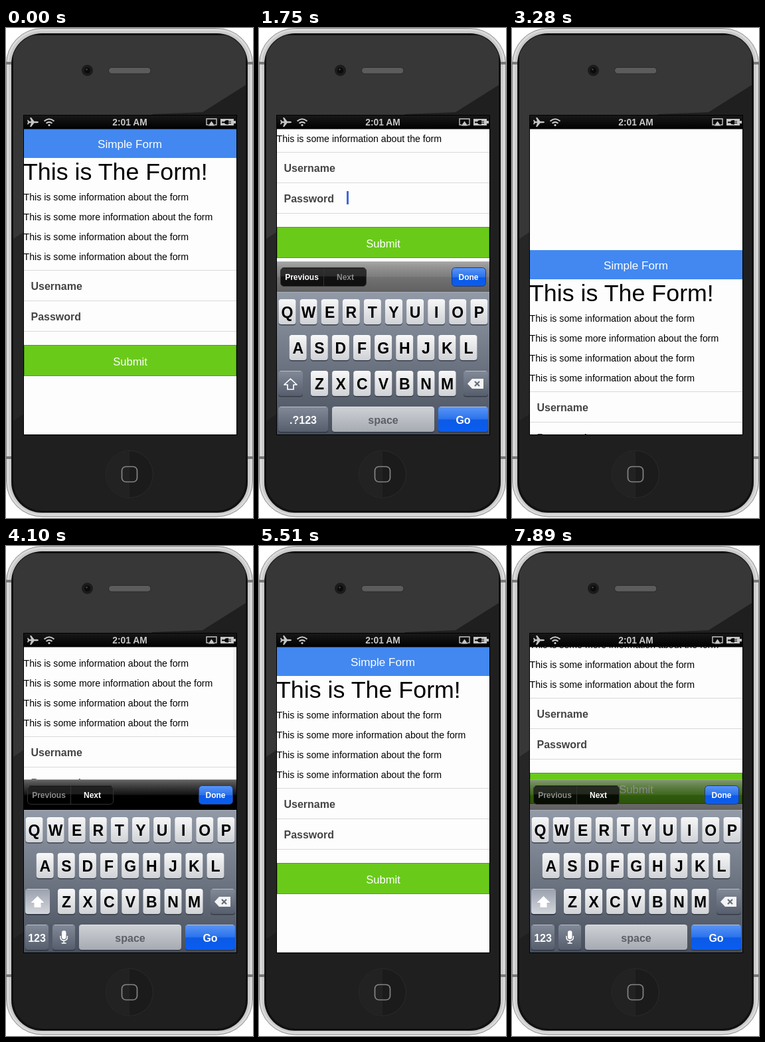
Write an HTML page that moves like this. It is 372 px wide and 739 px high and loops after 8000 ms.

```html
<!DOCTYPE html>
<html lang="en">
<head>
<meta charset="utf-8">
<title>Simple Form</title>
<style>
  html, body { margin: 0; width: 100%; height: 100%; overflow: hidden; background: #fff; }
  svg { display: block; font-family: "Liberation Sans", Arial, sans-serif; }
  .bold { font-weight: bold; }
  .mid { text-anchor: middle; }
  .copy { font-size: 14.17px; }
  .label { font-size: 16px; fill: #444; }
  .tool { font-size: 12px; fill: #fff; }
  .cap { font-size: 16px; fill: #fff; }
  .key { font-size: 23px; }
</style>
</head>
<body>
<svg width="372" height="739" viewBox="0 0 372 739">
  <defs id="defs">
    <clipPath id="screen"><rect x="27" y="132" width="320" height="481"/></clipPath>
    <clipPath id="page"><rect id="pageBox" x="27" y="152" width="320" height="461"/></clipPath>
    <clipPath id="bodyClip"><rect x="9" y="9" width="354" height="721" rx="45"/></clipPath>
    <linearGradient id="bar" x2="0" y2="1">
      <stop stop-color="#8c8c8c" stop-opacity=".75"/>
      <stop offset=".5" stop-color="#222" stop-opacity=".58"/>
      <stop offset=".52" stop-color="#000" stop-opacity=".55"/>
      <stop offset="1" stop-opacity=".62"/>
    </linearGradient>
    <linearGradient id="blue" x2="0" y2="1">
      <stop stop-color="#5b96f5"/><stop offset=".5" stop-color="#2a72ec"/>
      <stop offset=".52" stop-color="#0c5ae6"/><stop offset="1" stop-color="#0a5df0"/>
    </linearGradient>
  </defs>

  <!-- device -->
  <rect x=".5" y=".5" width="371" height="736.500" rx="54" fill="#c9c9c9" stroke="#8a8a8a"/>
  <rect x="3" y="3" width="366" height="731.500" rx="51" fill="none" stroke="#dadada" stroke-width="3"/>
  <path d="M0 53h8m356 0h8M0 648h8m356 0h8" stroke="#777" stroke-width="4"/>
  <rect x="8" y="8" width="356" height="723" rx="46" fill="#111"/>
  <g clip-path="url(#bodyClip)">
    <rect x="11" y="11" width="350" height="717" rx="44" fill="#1f1f1f"/>
    <path d="M11 11H361V86L296 127 220 130 26 308 26 582 11 592Z" fill="#373737"/>
    <path d="M11 318 26 308V582L11 592Z" fill="#262626"/>
  </g>
  <circle cx="122.500" cy="64" r="8.500" fill="#1b1b1b"/>
  <circle cx="122.500" cy="64" r="4.500" fill="#0b0b0c"/>
  <circle cx="121.500" cy="62.500" r="1.300" fill="#40454f"/>
  <rect x="154.500" y="59.500" width="63.500" height="9.500" rx="4.700" fill="#5c5c5c" stroke="#2a2a2a"/>
  <circle cx="186" cy="673" r="35.500" fill="#1b1b1b" stroke="#2b2b2b"/>
  <path d="M186 638a35 35 0 0 0 0 70Z" fill="#222"/>
  <rect x="174.500" y="661.500" width="23" height="23" rx="6" fill="none" stroke="#858585" stroke-width="1.700"/>
  <rect x="26" y="131" width="322" height="483"/>

  <g clip-path="url(#screen)">
    <g clip-path="url(#page)">
      <rect x="27" y="152" width="320" height="461" fill="#fdfdfd"/>
      <g id="content">
        <rect x="27" y="152" width="320" height="44" fill="#4288f0"/>
        <text class="mid" x="186.500" y="181" font-size="17.100" fill="#fff">Simple Form</text>
        <text x="26" y="228.500" font-size="35.800">This is The Form!</text>
        <g class="copy">
          <text x="26.500" y="260">This is some information about the form</text>
          <text x="26.500" y="290">This is some more information about the form</text>
          <text x="26.500" y="320">This is some information about the form</text>
          <text x="26.500" y="350">This is some information about the form</text>
        </g>
        <path d="M27 365.500h320m-320 46h320m-320 46h320" stroke="#d9d9d9"/>
        <text class="label bold" x="37.500" y="395">Username</text>
        <text class="label bold" x="37.500" y="441">Password</text>
        <rect id="caret" x="132" y="424" width="3" height="20" fill="#3f69d6"/>
        <rect x="27.500" y="478.500" width="319" height="46" fill="#6aca1a" stroke="#4e9c14"/>
        <text class="mid" x="187" y="508.500" font-size="16.600" fill="#fff">Submit</text>
      </g>
      <rect id="thumb" x="342" y="153" width="3" height="125" rx="1.500" fill="#555"/>
    </g>

    <g id="keyboard">
      <rect x="27" y="352" width="320" height="46" fill="url(#bar)"/>
      <path d="M27 352.500h320" stroke="#bbb" stroke-opacity=".45"/>
      <rect x="32.500" y="361.500" width="129" height="28" rx="5" fill="#000" fill-opacity=".85" stroke="#333"/>
      <path d="M33 362.500h128v12h-128z" fill="#fff" fill-opacity=".1"/>
      <path d="M97.500 362v28" stroke="#333"/>
      <text id="prev" class="tool bold mid" x="64.500" y="380">Previous</text>
      <text id="next" class="tool bold mid" x="130" y="380">Next</text>
      <rect x="290.500" y="361.500" width="51" height="28" rx="5" fill="url(#blue)" stroke="#223a78"/>
      <rect id="doneShade" x="291" y="362" width="50" height="27" rx="5" fill="#222c4a" opacity=".55"/>
      <text class="tool bold mid" x="315.500" y="380">Done</text>
      <rect x="27" y="398" width="320" height="216" fill="url(#panel)"/>
      <path d="M27 398.500h320" stroke="#aab1bc"/>
      <g id="keys"></g>
      <path d="M47.500 529l9.500 9h-5v7h-9v-7h-5z" fill="none" stroke="#fff" stroke-width="1.700" stroke-linejoin="round"/>
      <path d="M314 536.500l7-7.500h17v15h-17z" fill="#f4f4f4"/>
      <path d="M325 533l7 7m0-7l-7 7" stroke="#666e7c" stroke-width="2.200"/>
      <g id="passKeys"></g>
      <g id="userKeys"></g>
    </g>

    <rect x="27" y="132" width="320" height="20.500" fill="url(#status)"/>
    <g fill="#c6c6c6" stroke="#c6c6c6">
      <path d="M49 142q0-1.300-2.500-1.300h-4L38 135h-2l2 5.700h-3l-1.500-2H32l1 3.300-1 3.300h1.500l1.500-2h3L36 149h2l4.500-5.700h4Q49 143.300 49 142z" stroke="none"/>
      <path d="M57.500 140.500q7.500-6.500 15 0M60.500 143.700q4.500-3.700 9 0" fill="none" stroke-width="2"/>
      <circle cx="65" cy="146.500" r="1.200"/>
      <path d="M305 146h-3v-9h15v9h-3" fill="none" stroke-width="1.400"/>
      <path d="M309.500 140.500l5 7h-10z" stroke="none"/>
      <path d="M323 137h20v3h3v4h-3v3h-20z" stroke="none"/>
      <path d="M325 141.300h4q1-2.300 4-2.300h2v1.500h4v1h-4v1.500h4v1h-4v1.500h-2q-3 0-4-2.300h-4z" fill="#080808" stroke="none"/>
    </g>
    <text class="bold mid" x="186.500" y="147" font-size="13.800" fill="#c8c8c8">2:01 AM</text>
  </g>
</svg>
<script>
const $ = id => document.getElementById(id);

const gradient = (id, top, bottom) => $('defs').innerHTML +=
  `<linearGradient id="${id}" x2="0" y2="1"><stop stop-color="${top}"/><stop offset="1" stop-color="${bottom}"/></linearGradient>`;
gradient('status', '#181818', '#000');
gradient('panel', '#929aa7', '#474e5c');
gradient('light', '#f7f7f8', '#d0d2d6');
gradient('grey', '#828a98', '#565e6d');
gradient('space', '#ced1d6', '#a6aab1');
gradient('glow', '#9aa1ad', '#d3d6dc');

const cap = (x, y, w, fill, h = 38) =>
  `<rect x="${x}" y="${y + 1.5}" width="${w}" height="${h}" rx="4" fill="#2c323c" opacity=".8"/>
   <rect x="${x}" y="${y}" width="${w}" height="${h}" rx="4" fill="url(#${fill})"/>
   <path d="M${x + 3} ${y + .5}h${w - 6}" stroke="#fff" stroke-opacity=".45"/>`;
const word = (x, text, fill = '#fff') =>
  `<text class="cap bold mid" x="${x}" y="596.5" style="fill:${fill}">${text}</text>`;

const rows = [['QWERTYUIOP', 42.5, 409], ['ASDFGHJKL', 58.7, 463], ['ZXCVBNM', 91, 517]];
$('keys').innerHTML = rows.map(([letters, x0, y]) => [...letters].map((c, i) => {
  const x = x0 + i * 32.1;
  return cap(x - 13, y, 26, 'light') + `<text class="key bold mid" x="${x}" y="${y + 27.5}">${c}</text>`;
}).join('')).join('')
  + cap(29, 517, 37, 'grey') + cap(308, 517, 37, 'grey')
  + cap(110, 571, 154, 'space') + word(187, 'space', '#5c5f66')
  + cap(270, 571, 75, 'blue') + word(307.5, 'Go');
$('passKeys').innerHTML = cap(29, 571, 75, 'grey') + word(66.5, '.?123');
$('userKeys').innerHTML =
  cap(29, 517, 37, 'glow') + '<path d="M47.500 528l10 10h-5v7h-10v-7h-5z" fill="#fff"/>'
  + '<path d="M64 571h6v40h-6z" fill="#525968"/>'
  + cap(29, 571, 35, 'grey') + word(46.5, '123') + cap(70, 571, 34, 'grey')
  + `<rect x="84" y="580" width="6.500" height="13" rx="3.200" fill="#fff"/>
     <path d="M82 588v2q0 5 5.200 5t5.200-5v-2M87.200 595v4m-3.500 0h7" fill="none" stroke="#fff" stroke-width="1.500"/>`;

const LOOP = 8000, STEP = 59, KEYBOARD = 261;
const clamp = x => Math.min(1, Math.max(0, x));
const ramp = (t, start, end) => clamp((t - start) / (end - start));
// Progress advances in whole screen refreshes.
const stepped = (t, start, length) => clamp(Math.floor((t - start) / STEP) * STEP / length);
const easeOut = x => 1 - (1 - x) ** 2;
const smooth = x => x * x * (3 - 2 * x);
const mix = (a, b, x) => a + (b - a) * x;

// Password focus: the whole page rises, then settles.
function passwordPose(t, rise, riseLength, settle, settleLength) {
  const up = easeOut(stepped(t, rise, riseLength));
  const back = smooth(stepped(t, settle, settleLength));
  return { up, offset: -182 * up + 46 * back };
}

function poseAt(t) {
  if (t < 500) return { up: 0, offset: 0 };
  if (t < 3280) return passwordPose(t, 500, 710, 1690, 332);
  if (t < 4690) {
    const up = easeOut(stepped(t, 3280, 470));
    return { up, offset: 183 - KEYBOARD * up, resized: true };
  }
  if (t < 5500) {
    const up = 1 - easeOut(stepped(t, 4690, 724));
    return { up, offset: -KEYBOARD * up, resized: true, closing: true };
  }
  return passwordPose(t, 5982, 612, 6600, 480);
}

function userMode(t) {
  if (t < 3280) return ramp(t, 2170, 2290);
  return t < 5500 ? 1 : ramp(t, 7290, 7890);
}

function draw(t) {
  const { up, offset, resized, closing } = poseAt(t);
  const drop = Math.round(KEYBOARD * (1 - up)), y = Math.round(offset);
  const user = userMode(t);
  const bottom = resized ? 352 + drop : Math.min(613, 613 + y);
  const tone = x => { const v = Math.round(mix(140, 255, x)); return `rgb(${v},${v},${v})`; };

  $('content').setAttribute('transform', `translate(0 ${y})`);
  $('keyboard').setAttribute('transform', `translate(0 ${drop})`);
  $('pageBox').setAttribute('height', bottom - 152);
  $('caret').style.opacity = t >= 500 && user < .5 && up > 0 ? 1 : 0;
  $('thumb').style.opacity = resized && !closing && up === 1 ? mix(.4, .06, ramp(t, 3920, 4100)) : 0;
  $('passKeys').style.opacity = user < 1 ? 1 : 0;
  $('userKeys').style.opacity = user;
  $('prev').style.fill = tone(closing ? 0 : 1 - user);
  $('next').style.fill = tone(closing ? 0 : user);
  $('doneShade').style.opacity = closing ? .55 : 0;
}

function tick() {
  draw(performance.now() % LOOP);
  requestAnimationFrame(tick);
}
tick();
</script>
</body>
</html>
```
